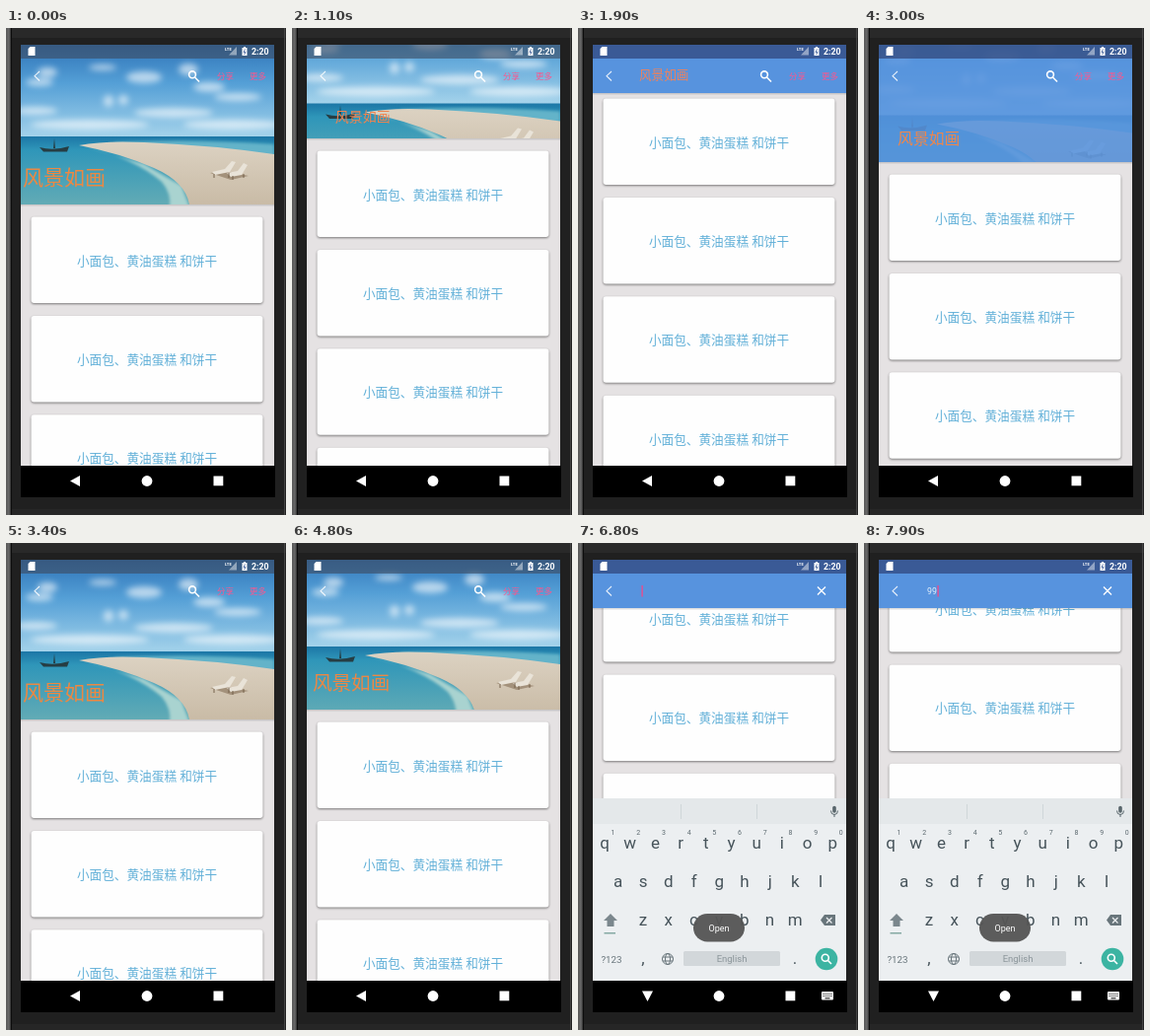
Animation of 284x494 px, one loop 8000 ms. Source, as an HTML page:

```html
<!DOCTYPE html>
<html lang="zh-CN">
<head>
<meta charset="utf-8">
<title>Collapsing header</title>
<style>
html, body { margin: 0; width: 100%; height: 100%; overflow: hidden; background: #202020; }
svg { display: block; width: 100%; height: 100%; }
text { font-family: Roboto, "Noto Sans CJK SC", "Noto Sans CJK", sans-serif; }
.card { fill: #fefefe; filter: drop-shadow(0 1.5px 1.3px rgba(0, 0, 0, .48)); }
.label { fill: #62b0d8; font-size: 12.65px; text-anchor: middle; }
.menu { fill: #f8588f; font-size: 8.5px; font-weight: 500; }
.key { fill: #46535a; font-size: 17px; text-anchor: middle; }
.hint { fill: #5d6a70; font-size: 7px; text-anchor: middle; }
.line { fill: none; stroke: #fff; }
</style>
</head>
<body>
<svg viewBox="0 0 284 494" preserveAspectRatio="none">
  <defs>
    <linearGradient id="sky" x2="0" y2="1">
      <stop offset="0" stop-color="#2f74b8"/><stop offset=".4" stop-color="#549fd6"/>
      <stop offset="1" stop-color="#a9d6ec"/>
    </linearGradient>
    <linearGradient id="sea" x2="0" y2="1">
      <stop offset="0" stop-color="#1c76a6"/><stop offset=".2" stop-color="#2f96b9"/>
      <stop offset="1" stop-color="#62abb5"/>
    </linearGradient>
    <linearGradient id="sand" x2="0" y2="1">
      <stop offset="0" stop-color="#dcd2c2"/><stop offset="1" stop-color="#c9bba6"/>
    </linearGradient>
    <linearGradient id="edge">
      <stop offset="0" stop-color="#565656"/><stop offset=".6" stop-color="#6a6a6a"/>
      <stop offset="1" stop-color="#2c2c2c"/>
    </linearGradient>
    <filter id="soft" x="-20%" y="-20%" width="140%" height="140%"><feGaussianBlur stdDeviation="3"/></filter>
    <filter id="blur"><feGaussianBlur stdDeviation="1.5"/></filter>
    <clipPath id="screen"><rect x="15" y="17" width="257" height="428"/></clipPath>
    <clipPath id="headClip"><rect id="headRect" x="15" y="17" width="257" height="162"/></clipPath>
  </defs>

  <rect width="284" height="494" fill="#202020"/>
  <rect width="284" height="10" fill="#292929"/>
  <rect width="5" height="494" fill="url(#edge)"/>
  <rect x="5" width="1" height="494" fill="#0c0c0c"/>
  <rect x="282" width="1" height="494" fill="#444"/>
  <rect x="6" y="488" width="276" height="6" fill="#262626"/>

  <g clip-path="url(#screen)">
    <rect x="15" y="17" width="257" height="428" fill="#e5e2e3"/>
    <g id="cards"></g>
    <rect id="shade" x="15" width="257" height="1.5" fill="#000" opacity=".12"/>

    <g clip-path="url(#headClip)">
      <g id="photo">
        <rect x="15" y="17" width="257" height="97" fill="url(#sky)"/>
        <g id="clouds" fill="#fff" filter="url(#soft)"></g>
        <rect x="15" y="110" width="257" height="69" fill="url(#sea)"/>
        <path d="M78 119Q130 132 158 156Q168 168 166 182H186L178 160L140 138Z" fill="#a9d3d0" filter="url(#blur)"/>
        <path d="M110 116Q190 112 272 118V130Q190 122 110 118Z" fill="#63b3c9" filter="url(#blur)"/>
        <path d="M74 119Q100 114 140 116Q210 119 272 128V179H186Q182 156 150 142Q116 127 74 119Z" fill="url(#sand)"/>
        <path d="M34 121Q48 125 64 120L62 125.500H38ZM48 122L49 112L50 122Z" fill="#263d43"/>
        <path d="M207 147L222 145L246 150L228 154Z" fill="#a3917b"/>
        <path d="M209 146L222 143L229 135L233 136L227 146L212 149ZM224 147L235 145L241 137L245 139L239 149L228 151Z" fill="#e9e3d8"/>
        <path d="M211 148V152M226 147V152M230 150V154M241 148V152" stroke="#75604b"/>
      </g>
      <rect x="15" y="17" width="257" height="14" fill="#3d4a60" opacity=".6"/>
      <g id="scrim">
        <rect x="15" y="17" width="257" height="162" fill="#5793de"/>
        <rect x="15" y="17" width="257" height="14" fill="#3a5a96"/>
      </g>
    </g>

    <path class="line" d="M34 44L29 48.7L34 53.5" stroke-width="1.1" opacity=".85"/>
    <g id="bar">
      <text id="title"/>
      <g class="line" stroke-width="1.6"><circle cx="189" cy="47.3" r="3.4"/><path d="M191.5 50L196 54.5"/></g>
      <text class="menu" x="214" y="52">分享</text>
      <text class="menu" x="247" y="52">更多</text>
    </g>
    <g id="search">
      <text id="query" x="64" y="51.8" font-size="8.8" fill="#e3eefb"/>
      <rect id="caret" y="43" width="1.2" height="11.5" fill="#ff4081"/>
      <path class="line" d="M243 44.5L251 52.5M251 44.5L243 52.5" stroke-width="1.4"/>
    </g>

    <g fill="#fff">
      <path d="M24.5 19H29.5V28H22.5V21Z"/>
      <path d="M234 19V27.5H226Z" opacity=".45"/>
      <text x="222" y="23" font-size="4.2" font-weight="700">LTE</text>
      <path d="M239.5 20H241V19H243V20H244.5V28H239.5Z"/>
      <path d="M242.5 21.5L241 24.5H243L241.6 27" fill="none" stroke="#3a5a96" stroke-width=".8"/>
      <text x="249" y="27" font-size="8.8" font-weight="700">2:20</text>
    </g>

    <g id="board">
      <rect x="15" y="259" width="257" height="186" fill="#eceff1"/>
      <rect x="15" y="259" width="257" height="26" fill="#e4e8ea"/>
      <path d="M104.5 265V280M181.5 265V280" stroke="#cfd6d9"/>
      <g fill="none" stroke="#59666c">
        <path d="M260 268.5V272" stroke-width="3.6" stroke-linecap="round"/>
        <path d="M256.5 271.5Q256.5 275.5 260 275.5T263.5 271.5M260 275.5V278"/>
      </g>
      <g id="keys"></g>
      <path d="M33 376L40 383H36.5V389H29.5V383H26Z" fill="#7b878d"/>
      <rect x="26.5" y="395" width="11.5" height="1.5" fill="#86a9a4"/>
      <path d="M250 377H261V388H250L246 382.5Z" fill="#68757b"/>
      <path d="M252 380L257.5 385.5M257.5 380L252 385.5" stroke="#eceff1" stroke-width="1.2"/>
      <g fill="none" stroke="#68757b">
        <circle cx="91" cy="422" r="5.5"/><ellipse cx="91" cy="422" rx="2.5" ry="5.5"/>
        <path d="M86 420H96M86 424H96"/>
      </g>
      <rect x="107" y="414" width="98" height="15" rx="1.5" fill="#d2d7da"/>
      <text x="156" y="425" font-size="9.5" fill="#8b959a" text-anchor="middle">English</text>
      <text x="34" y="425.5" font-size="9.8" fill="#68757b" text-anchor="middle">?123</text>
      <circle cx="252" cy="422" r="11.3" fill="#3cb4a2"/>
      <g class="line" stroke-width="1.6"><circle cx="250.8" cy="420.8" r="3.5"/><path d="M253.5 423.5L257 427"/></g>
    </g>
    <g id="toast">
      <rect x="117" y="376" width="52" height="28.5" rx="14.2" fill="#555"/>
      <text x="143" y="394" font-size="9" fill="#fff" text-anchor="middle">Open</text>
    </g>
  </g>

  <rect x="15" y="444" width="258" height="32" fill="#000"/>
  <g fill="#fff">
    <path id="back"/>
    <circle cx="143" cy="459.5" r="5.4"/>
    <rect x="210.5" y="454.5" width="9.8" height="9.8"/>
    <g id="ime">
      <rect x="247" y="455" width="12" height="8.5" rx="1"/>
      <path d="M248.5 457.5H258M248.5 459.5H258" stroke="#000" stroke-dasharray="1 1"/>
      <path d="M250.5 461.8H255.5" stroke="#000"/>
    </g>
  </g>
</svg>
<script>
const $ = id => document.getElementById(id);
const set = (id, attrs) => { for (const k in attrs) $(id).setAttribute(k, attrs[k]); };
const show = (id, on) => set(id, { opacity: +on });
const clamp = v => Math.min(1, Math.max(0, v));
const smooth = v => { v = clamp(v); return v * v * (3 - 2 * v); };

const LOOP = 8000, STEP = 100, PITCH = 100.4, RANGE = 113;

// [time, scroll] pairs, read linearly
const scrollKeys = [
  [700, 0], [800, 7], [900, 24], [1000, 45], [1100, 67], [1300, 99], [1500, 116], [1700, 120],
  [2600, 120], [2700, 111], [2800, 91], [3000, 43], [3200, 11], [3400, 0],
  [4700, 0], [4800, 10], [4900, 35], [5100, 100], [5300, 143], [5500, 158.5],
  [7500, 158.5], [7900, 168.5]
];

function track(keys, t) {
  const i = keys.findIndex(k => k[0] > t);
  if (i < 0) return keys[keys.length - 1][1];
  if (i === 0) return keys[0][1];
  const [t0, a] = keys[i - 1], [t1, b] = keys[i];
  return a + (b - a) * (t - t0) / (t1 - t0);
}

const scrimAt = t =>
  smooth((t - 1150) / 600) - smooth((t - 2890) / 510) + smooth((t - 5000) / 500);

function build() {
  let cards = '';
  for (let i = 0; i < 5; i++) {
    const y = 191.5 + i * PITCH;
    cards += `<rect class="card" x="25.5" y="${y}" width="235" height="87.5" rx="3"/>` +
      `<text class="label" x="143" y="${y + 49}">小面包、黄油蛋糕 和饼干</text>`;
  }
  $('cards').innerHTML = cards;

  const puffs = [[42, 45, 10, 5], [34, 55, 14, 4], [104, 74, 5, 6], [119, 73, 5, 5], [98, 40, 14, 3],
    [140, 50, 18, 6], [185, 42, 10, 6], [206, 60, 16, 5], [235, 70, 24, 4],
    [30, 84, 22, 4], [170, 86, 40, 5], [85, 98, 60, 5], [230, 98, 50, 5]];
  $('clouds').innerHTML = puffs.map(([x, y, rx, ry]) =>
    `<ellipse cx="${x}" cy="${y}" rx="${rx}" ry="${ry}" opacity=".6"/>`).join('');

  const row = (chars, x, y, cls) => [...chars].map((c, i) =>
    `<text class="${cls}" x="${x + i * 25.7}" y="${y}">${c}</text>`).join('');
  $('keys').innerHTML = row('qwertyuiop', 27, 310, 'key') + row('1234567890', 35.5, 296, 'hint') +
    row('asdfghjkl', 40.5, 349, 'key') + row('zxcvbnm', 66, 388, 'key') +
    row(',', 66, 427, 'key') + row('.', 220, 427, 'key');
  $('title').textContent = '风景如画';
}

function drawHeader(t) {
  const s = track(scrollKeys, t), p = clamp(s / RANGE);
  const size = 21 - 8.4 * (1 - (1 - p) ** 2);
  const bottom = 179 - RANGE * p;
  set('cards', { transform: `translate(0 ${-s})` });
  set('photo', { transform: `translate(0 ${-RANGE * p / 2})` });
  set('headRect', { height: bottom - 17 });
  set('shade', { y: bottom });
  set('scrim', { opacity: scrimAt(t) });
  set('title', {
    x: 17 + 45 * p, y: 152 - 104 * p + size * .34, 'font-size': size,
    fill: `rgb(${236 + 4 * p},${136 - 6 * p},${66 + 24 * p})`
  });
}

function drawSearch(t) {
  const open = t >= 6200, typing = t >= 6300, rise = smooth((t - 6300) / 500);
  const query = t < 7500 ? '' : t < 7700 ? '9' : '99';
  show('bar', !open);
  show('search', open);
  $('query').textContent = query;
  set('caret', { x: 64.5 + query.length * 5, opacity: +(t < 7100 || t >= 7500) });
  set('board', { transform: `translate(0 ${186 * (1 - rise)})`, opacity: +(rise > 0) });
  set('toast', { opacity: .95 * clamp((t - 6500) / 300) });
  set('back', { d: typing ? 'M65 454.5H76L70.5 465Z' : 'M65 459.5L75 454V465Z' });
  show('ime', typing);
}

const start = performance.now();
function frame() {
  const now = (performance.now() - start) % LOOP;
  const t = Math.floor(now / STEP) * STEP;
  drawHeader(t);
  drawSearch(t);
  requestAnimationFrame(frame);
}

build();
frame();
</script>
</body>
</html>
```
